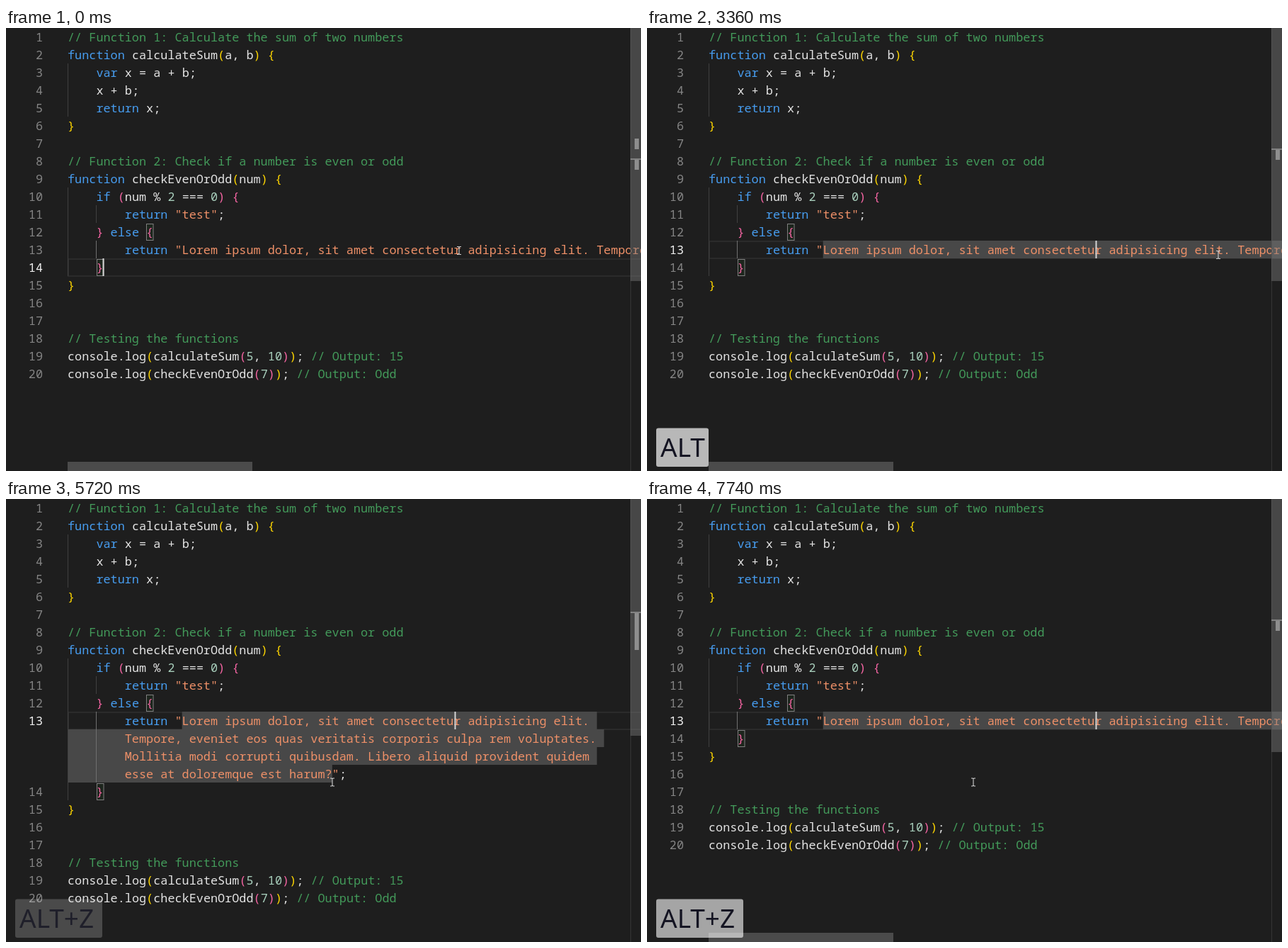
Recreate the animation shown at these times as an HTML page. Size 897 px wide and 625 px high, loop 8 s.

```html
<!DOCTYPE html>
<html lang="en">
<head>
<meta charset="utf-8">
<title>Word wrap toggle</title>
<style>
  html, body { margin: 0; width: 100%; height: 100%; overflow: hidden; background: #1e1e1e; }
  svg { display: block; width: 100%; height: 100%; }
  text { white-space: pre; }
  .code text { font: 16.84px "Noto Sans Mono", "DejaVu Sans Mono", monospace; fill: #e4e4e4; }
  .code .num { fill: #858585; text-anchor: end; }
  .code .now { fill: #f0f0f0; }
  .com { fill: #439a5a; }
  .str { fill: #ee9068; }
  .key { fill: #479df0; }
  .lit { fill: #a9d0bd; }
  .b0 { fill: #ffd700; }
  .b1 { fill: #f565a3; }
  .keys text { font: 37px "Noto Sans", "Open Sans", sans-serif; fill: #141422; }
</style>
</head>
<body>
<svg id="stage" viewBox="0 0 897 625"></svg>
<script>
const LOOP = 8000, CLICK = 330, WRAP = 3490, UNWRAP = 6740;
const LEFT = 87, CHAR = 10.104, ROW = 25;
const stage = document.getElementById('stage');

function add(parent, tag, attrs, text) {
  const el = document.createElementNS('http://www.w3.org/2000/svg', tag);
  for (const k in attrs) el.setAttribute(k, attrs[k]);
  if (text !== undefined) el.textContent = text;
  parent.appendChild(el);
  return el;
}
const rect = (parent, x, y, width, height, fill, more) =>
  add(parent, 'rect', { x, y, width, height, fill, ...more });
const show = (el, on) => el.setAttribute('visibility', on ? 'visible' : 'hidden');
const clamp = (v, a = 0, b = 1) => Math.min(b, Math.max(a, v));

const lorem = [
  'Lorem ipsum dolor, sit amet consectetur adipisicing elit. ',
  'Tempore, eveniet eos quas veritatis corporis culpa rem voluptates. ',
  'Mollitia modi corrupti quibusdam. Libero aliquid provident quidem ',
  'esse at doloremque est harum?'
];
const head = `// Function 1: Calculate the sum of two numbers
function calculateSum(a, b) {
    var x = a + b;
    x + b;
    return x;
}

// Function 2: Check if a number is even or odd
function checkEvenOrOdd(num) {
    if (num % 2 === 0) {
        return "test";
    } else {`.split('\n');
const tail = `    }
}


// Testing the functions
console.log(calculateSum(5, 10)); // Output: 15
console.log(checkEvenOrOdd(7)); // Output: Odd`.split('\n');

function tokenizer() {
  let depth = 0, open = false;
  const rule = /(\/\/.*)|("[^"]*"?)|\b(function|var|return|if|else)\b|\b(\d+)\b|([({])|([)}])|[^\s\w]|\w+|\s+/g;
  return line => {
    const out = [];
    if (open) {
      const part = line.match(/^[^"]*"?/)[0];
      out.push(['str', part]);
      open = !part.endsWith('"');
      line = line.slice(part.length);
    }
    for (const m of line.matchAll(rule)) {
      let kind = '';
      if (m[1]) kind = 'com';
      else if (m[2]) { kind = 'str'; open = !/^".*"$/.test(m[2]); }
      else if (m[3]) kind = 'key';
      else if (m[4]) kind = 'lit';
      else if (m[5]) kind = 'b' + depth++ % 2;
      else if (m[6]) kind = 'b' + --depth % 2;
      out.push([kind, m[0]]);
    }
    return out;
  };
}

function editor(active, wrapped, marked) {
  const g = add(stage, 'g', { class: 'code' });
  const start = '        return "';
  const body = wrapped
    ? lorem.map((s, i) => (i ? '        ' : start) + s + (i === 3 ? '";' : ''))
    : [start + lorem.join('') + '";'];
  const lines = [...head, ...body, ...tail];
  const closeTop = (12 + body.length) * ROW;
  const lineTop = (active - 1) * ROW;

  rect(g, LEFT + 1, lineTop + 1, 830, 24, 'none', { stroke: '#2b2b2b', 'stroke-width': 2 });
  if (marked) {
    body.forEach((s, i) => {
      const x = i ? LEFT : LEFT + start.length * CHAR;
      const end = wrapped ? s.length - (i === 3 ? 2 : 0) : 90;
      rect(g, x, 300 + i * ROW, LEFT + end * CHAR - x, ROW, '#484848');
    });
  }

  rect(g, 87, 50, 1, 75, '#404040');
  rect(g, 87, 225, 1, closeTop - 200, '#404040');
  rect(g, 127, 250, 1, 25, '#404040');
  rect(g, 127, 300, 1, closeTop - 300, '#707070');
  for (const [x, y] of [[198.5, 276.5], [128.5, closeTop + 1.5]])
    rect(g, x, y, 9.5, 23, '#1d251d', { stroke: '#808080' });

  const tokens = tokenizer();
  let number = 0;
  lines.forEach((line, i) => {
    const y = i * ROW + 19;
    if (i <= 12 || i >= 12 + body.length) {
      number++;
      add(g, 'text', { x: 52, y, class: number === active ? 'num now' : 'num' }, number);
    }
    const row = add(g, 'text', { x: LEFT, y });
    for (const [kind, s] of tokens(line)) add(row, 'tspan', kind ? { class: kind } : {}, s);
  });

  rect(g, 882, 0, 1, 625, '#353535');
  const ruler = (y, h) => rect(g, 888, y, 6, h, '#a0a0a0');
  if (!marked) ruler(156, 15);
  const top = wrapped ? 160 : marked ? 171 : 185;
  ruler(top, wrapped ? 53 : 15);
  rect(g, 882, top - 1, 15, 2, '#8a8a8a');
  rect(g, 882, 0, 15, wrapped ? 334 : 357, '#797979', { opacity: .45 });
  return g;
}

const before = editor(14, false, false);
const flat = editor(13, false, true);
const wrap = editor(13, true, true);
const hbar = rect(stage, 87, 612, 261, 13, '#4b4b4b');
const caret = rect(stage, 0, 0, 2, 25, '#d4d4d4');

const pointer = add(stage, 'path', {
  d: 'M-3 -5.5H-1L0 -4.5L1 -5.5H3M0 -4.5V4.5M-3 5.5H-1L0 4.5L1 5.5H3',
  fill: 'none', stroke: '#d0d0d0', 'stroke-width': 1.1
});

// Key captions, newest at the bottom
const keyLayer = add(stage, 'g', { class: 'keys' });
const captions = [
  ['Left click', 158, CLICK, 2680],
  ['ALT', 74, 3230, 3970],
  ['ALT+Z', 123, WRAP, 7140],
  ['ALT', 74, 6480, 7140],
  ['ALT+Z', 123, UNWRAP, LOOP]
].map(([label, width, from, to]) => {
  const el = add(keyLayer, 'g', {});
  const plate = rect(el, 13, 0, width, 54.5, '#fff', { rx: 3 });
  const text = add(el, 'text', { x: 19, y: 40 }, label);
  return { el, plate, text, from, to };
});

// Each press restarts the fade at the second time
const presses = [[CLICK, CLICK], [3230, 3230], [WRAP, 3620], [6480, 6480], [UNWRAP, 7260]];
function captionAlpha(t) {
  const last = presses.filter(p => p[0] <= t).pop();
  return last ? clamp(.72 - .00025 * Math.max(0, t - last[1]), 0, .72) : 0;
}

// time, x, y
const path = [
  [0, 640, 314], [380, 640, 314], [880, 829, 316], [1350, 885, 338], [1800, 891, 346],
  [2350, 808, 320], [2600, 807, 320], [4750, 807, 320], [5050, 690, 273],
  [5480, 461, 399.5], [LOOP, 461, 399.5]
];
function pointerAt(t) {
  const i = Math.max(1, path.findIndex(p => p[0] > t));
  const a = path[i - 1], b = path[i];
  const u = (t - a[0]) / (b[0] - a[0]), e = u * u * (3 - 2 * u);
  return [a[1] + (b[1] - a[1]) * e, a[2] + (b[2] - a[2]) * e];
}

function draw(t) {
  const clicked = t >= CLICK, wrapped = t >= WRAP && t < UNWRAP;
  show(before, !clicked);
  show(flat, clicked && !wrapped);
  show(wrap, wrapped);

  hbar.setAttribute('opacity', wrapped ? 0 : t < WRAP ? 1 : clamp(.25 + (t - 6750) / 400));

  caret.setAttribute('x', clicked ? 633.5 : 136.5);
  caret.setAttribute('y', clicked ? 300 : 325);
  show(caret, !clicked || (t - 3280 + 4 * 1070) % 1070 < 480);

  const [x, y] = pointerAt(t);
  pointer.setAttribute('transform', `translate(${x.toFixed(1)} ${y.toFixed(1)})`);

  const alpha = captionAlpha(t);
  let top = 564.5;
  for (const c of [...captions].reverse()) {
    const on = t >= c.from && t < c.to;
    show(c.el, on);
    if (!on) continue;
    c.el.setAttribute('transform', `translate(0 ${top})`);
    c.plate.setAttribute('opacity', alpha);
    c.text.setAttribute('opacity', clamp(alpha * 4));
    top -= 59;
  }
}

function tick(now) {
  draw(now % LOOP);
  requestAnimationFrame(tick);
}
draw(0);
requestAnimationFrame(tick);
</script>
</body>
</html>
```
